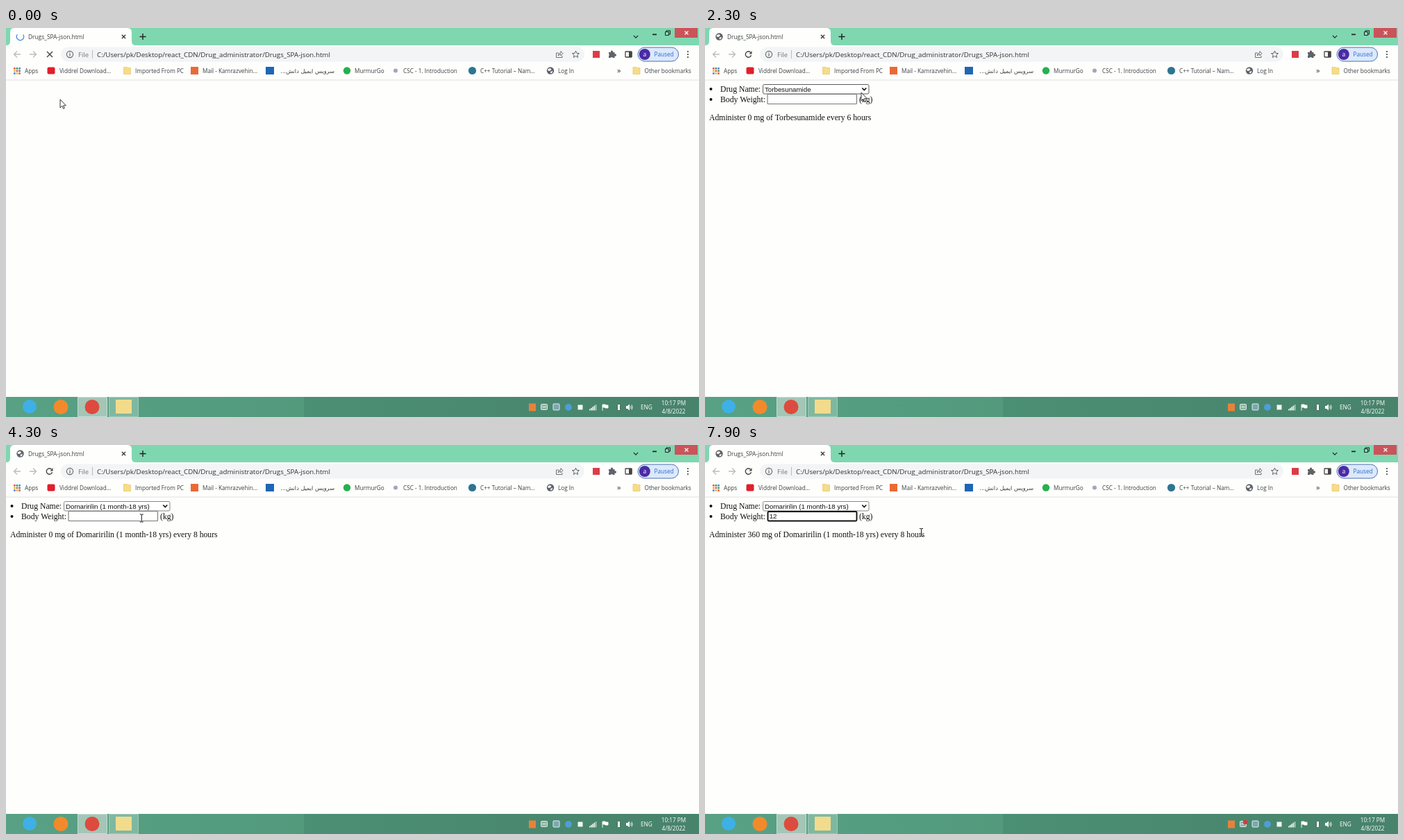
These frames come from a looping animation (998 by 561 pixels, 8 s). An HTML page with a canvas:

```html
<!DOCTYPE html>
<html lang="en">
<head>
<meta charset="utf-8">
<style>
html, body { margin: 0; width: 100%; height: 100%; overflow: hidden; background: #fefefd; }
canvas { display: block; }
</style>
</head>
<body>
<canvas id="stage" width="998" height="561"></canvas>
<script>
const g = document.getElementById('stage').getContext('2d');
const LOOP = 8000;
const UI = '"Open Sans", sans-serif', SERIF = '"Liberation Serif", serif', SANS = '"Liberation Sans", sans-serif';
const INK = '#3c4043', GREY = '#5f6368', PAPER = '#fefefd';

const LOADED = 700, OPEN = 2500, PICK = 4100, FOCUS = 5100, TYPE1 = 5900, TYPE2 = 6200;
const TRAY_FLIPS = [1500, 2000, 2500, 4000, 4500, 5600, 6600, 7000, 7600];
const CARET_FLIPS = [FOCUS, 6900, 7300, 7600];
const PATH = [
  [0, 78, 103], [600, 78, 103], [1300, 214, 112], [1500, 220, 104], [1600, 223, 98], [2000, 225, 91],
  [2300, 225, 93], [2900, 225, 93], [3500, 197, 113], [4000, 197, 113], [4400, 194, 103],
  [4800, 188, 92], [5100, 168, 103], [7200, 168, 103], [7400, 280, 119], [7600, 280, 119], [7900, 311, 126]
];
const DRUGS = ['Torbesunamide', 'Domaririlin (1 month-18 yrs)', 'Ru-Belomitav', 'Petrisomavin (<15 Kg)',
  'Havolidin (1 month-18 yrs)', 'Nilurofatesin (1 month-18 yrs)', 'Kartovumelin (1 month-18 yrs)',
  'Malvorenitase (1 month-18 yrs)', 'Ritlosarention (3 month-18 yrs)', 'Varisobulomeden', 'Sebromaxin (1-18 yrs)'];

function text(s, x, y, color = INK, size = 8.2, font = UI, align = 'left') {
  g.font = `${size}px ${font}`;
  g.textAlign = align;
  g.fillStyle = color;
  g.fillText(s, x, y);
}
function rect(x, y, w, h, color) {
  g.fillStyle = color;
  g.fillRect(x, y, w, h);
}
function box(x, y, w, h, r, fill, stroke, width = 1) {
  g.beginPath();
  g.roundRect(x, y, w, h, r);
  paint(fill, stroke, width);
}
function disc(x, y, r, fill, stroke, width = 1) {
  g.beginPath();
  g.arc(x, y, r, 0, 2 * Math.PI);
  paint(fill, stroke, width);
}
function path(d, x, y, fill, stroke, width = 1) {
  g.save();
  g.translate(x, y);
  const p = new Path2D(d);
  if (fill) { g.fillStyle = fill; g.fill(p); }
  if (stroke) { g.strokeStyle = stroke; g.lineWidth = width; g.stroke(p); }
  g.restore();
}
function paint(fill, stroke, width) {
  if (fill) { g.fillStyle = fill; g.fill(); }
  if (stroke) { g.strokeStyle = stroke; g.lineWidth = width; g.stroke(); }
}
function globe(x, y) {
  disc(x, y, 5.2, GREY);
  path('M-3.5-2.5L0-3.5L1.5-1.5L-1 .5L-3.8 0ZM0 1.5L3.5 .2L2.5 3.2L.5 4Z', x, y, '#f4f4f4');
}
function folder(x, y) {
  path('M-5-5H0L1-4H5V5H-5Z', x, y, '#f6dc86', '#e6c667', .7);
}

function drawTabs(t) {
  rect(0, 0, 998, 25, '#7fd7b0');
  path('M0 25Q6 25 6 19V6Q6 0 12 0H175Q181 0 181 6V19Q181 25 187 25Z', 0, 0, PAPER);
  if (t < LOADED) {
    const a = t / 160 - .6;
    g.beginPath();
    g.arc(20.5, 12.5, 5.2, a, a + 4.4);
    paint(null, '#4b8fe8', 1.4);
  } else globe(20.5, 12.5);
  text('Drugs_SPA-json.html', 32, 15.5, INK, 8.35);
  path('M-2.6-2.6L2.6 2.6M2.6-2.6L-2.6 2.6', 169.5, 12.5, null, '#222', 1.3);
  path('M-4.5 0H4.5M0-4.5V4.5', 197, 12.5, null, '#222', 1.4);
  path('M-3.2-1.6L0 1.6L3.2-1.6', 907, 12.5, null, '#223', 1.2);
  rect(931, 8.5, 6, 1.7, '#222');
  path('M-3-1.5H2V3.5H-3ZM-1.5-1.5V-3.2H4V2H2', 952.5, 7, null, '#222', 1);
  rect(963, 0, 33, 14, '#c9545a');
  path('M-2.5-2.5L2.5 2.5M2.5-2.5L-2.5 2.5', 980, 7, null, '#fff', 1.2);
}

function drawToolbar(t) {
  rect(0, 25, 998, 50, PAPER);
  const arrow = 'M5 0H-4.5M0-4.5L-4.5 0L0 4.5';
  path(arrow, 16, 38, null, '#b9bcc0', 1.3);
  g.save();
  g.scale(-1, 1);
  path(arrow, -39, 38, null, '#b9bcc0', 1.3);
  g.restore();
  if (t < LOADED) path('M-4-4L4 4M4-4L-4 4', 63, 38, null, '#444', 1.4);
  else {
    g.beginPath();
    g.arc(62.5, 38, 4.2, .3, 5.5);
    paint(null, '#444', 1.4);
    path('M1 0H5V-4.5Z', 62.5, 37.5, '#444');
  }
  box(79, 27.5, 754, 21, 10.5, '#f3f4f5');
  disc(92, 38, 4.6, null, GREY, 1.1);
  rect(91.4, 37.2, 1.2, 3.4, GREY);
  rect(91.4, 35.2, 1.2, 1.2, GREY);
  text('File', 104, 41.5, '#777', 9.5);
  rect(124, 32, 1, 12, '#b8bbbf');
  text('C:/Users/pk/Desktop/react_CDN/Drug_administrator/Drugs_SPA-json.html', 131, 41.5, '#303134', 9.77);

  path('M-1-2H-4.5V4.5H4V2M-2 2Q-1.5-2 2-2V-4.5L5-1.2L2 1.8V0Q0 0-2 2Z', 797, 38, null, GREY, .9);
  path('M0-5L1.4-1.7L5-1.4L2.3 1L3.1 4.5L0 2.6L-3.1 4.5L-2.3 1L-5-1.4L-1.4-1.7Z', 820.5, 38, null, GREY, 1);
  rect(845, 33, 10, 10, '#dc3c48');
  path('M-5-3H-2A1.7 1.7 0 1 1 1-3H3.5V-.5A1.7 1.7 0 1 1 3.5 2.5V5H.8A1.7 1.7 0 0 0-2.2 5H-5V2A1.6 1.6 0 0 0-5-.7Z', 873, 38, GREY);
  box(892, 34, 9, 8, .5, null, '#444', 1.3);
  rect(897, 34, 4.5, 8, '#444');
  box(910, 28, 58.5, 20, 10, '#dbe9fc', '#4d6fae', 1);
  disc(919.8, 38, 8, '#4a2ba5');
  text('a', 919.8, 41, '#fff', 8.5, UI, 'center');
  text('Paused', 933.5, 41, '#2f68c5', 8.2);
  for (const y of [34, 38, 42]) disc(982, y, 1.1, '#444');
}

function drawBookmarks() {
  const y = 64.5, cy = 61.5;
  const appColors = ['#e5594a', '#3d9b5f', '#4a86e0', '#e9b534'];
  for (let i = 0; i < 9; i++) rect(11 + i % 3 * 3.6, 57 + (i / 3 | 0) * 3.6, 2.6, 2.6, appColors[i % 4]);
  text('Apps', 27, y);
  box(59.5, 56.5, 11, 10, 2, '#e0202b');
  text('Viddrel Download...', 77, y);
  folder(174.5, cy);
  text('Imported From PC', 186, y);
  rect(266, 56, 11, 11, '#ea6a35');
  text('Mail - Kamrazvehin...', 283, y);
  rect(374, 56, 12, 11, '#1f66b5');
  g.direction = 'rtl';
  text('سرویس ایمیل دانش...', 473, y, INK, 8.2, '"DejaVu Sans", sans-serif', 'right');
  g.direction = 'ltr';
  disc(491, cy, 5.2, '#27b04f');
  text('MurmurGo', 502, y);
  disc(561, cy, 3, '#a3a7b8');
  text('CSC - 1. Introduction', 572, y);
  disc(671.5, cy, 5.6, '#2d7591');
  text('C++ Tutorial – Nam...', 683, y);
  globe(784, cy);
  text('Log In', 795, y);
  text('»', 880, y, '#333', 11);
  folder(908, cy);
  text('Other bookmarks', 919.5, y);
  rect(0, 74.5, 998, 1, '#dfe1e3');
}

function drawTaskbar(t) {
  const bar = g.createLinearGradient(0, 0, 998, 0);
  bar.addColorStop(0, '#58a184');
  bar.addColorStop(.43, '#539a7d');
  bar.addColorStop(.43, '#4b8f74');
  bar.addColorStop(1, '#48836c');
  rect(0, 532, 998, 29, bar);
  box(103.5, 532.5, 42, 28, 0, '#a3c6b7', '#c5ddd2');
  box(148.5, 532.5, 42, 28, 0, '#7fb8a0', '#9fcab7');
  disc(34, 546, 10, '#3fb0e6');
  disc(79, 546.5, 10.5, '#f28a2c');
  disc(124, 546.5, 10.5, '#dd4b3e');
  rect(158, 536, 23, 20, '#f2dc8c');

  rect(753, 541.5, 10, 11, '#e8823a');
  box(770.5, 542.5, 9, 8, 1, '#8fb5a6', '#e4eee9', 1);
  rect(772.5, 546, 5, 1, '#e4eee9');
  if (flipped(TRAY_FLIPS, t)) disc(778, 544, 3.2, '#d23b42');
  box(788, 542, 9, 9, 1, '#7aa7b4', '#e4eee9', 1);
  disc(810, 547, 5, '#4d9ed4');
  rect(823.5, 543.5, 7, 7, '#f2f7f4');
  for (let i = 0; i < 5; i++) rect(840 + i * 2.2, 549.5 - i * 1.6, 1.5, 2 + i * 1.6, i < 4 ? '#fff' : '#b9d6ca');
  path('M-4-4V5M-4-4H0L1-3H4V1H0L-1 0H-4', 863, 547, '#fff', '#fff', .9);
  box(880.5, 542.5, 4, 9, 1, '#fff', '#2f5a4a', .8);
  path('M-5-2H-3L0-4.5V4.5L-3 2H-5Z', 898, 547, '#fff');
  path('M1.5-2Q3 0 1.5 2M3-3.5Q5.5 0 3 3.5', 898, 547, null, '#fff', .9);
  text('ENG', 914, 550, '#fff', 8.2);
  text('10:17 PM', 961.5, 544, '#fff', 8.2, UI, 'center');
  text('4/8/2022', 961.5, 556, '#fff', 8.2, UI, 'center');
}

function drawPage(t, mouse) {
  const drug = DRUGS[t < PICK ? 0 : 1], hours = t < PICK ? 6 : 8;
  const weight = t < TYPE1 ? '' : t < TYPE2 ? '1' : '12';
  const say = (s, x, y) => text(s, x, y, '#111', 11.69, SERIF);

  disc(8.5, 88, 2, '#111');
  disc(8.5, 103, 2, '#111');
  say('Drug Name:', 22, 91.5);
  say('Body Weight:', 22, 106.5);
  say('(kg)', 222, 106.5);
  say(`Administer ${weight * 30} mg of ${drug} every ${hours} hours`, 6, 132.5);

  box(83.5, 81.5, 152.5, 13.5, 2, '#fff', overSelect(mouse) ? '#5a5a5a' : '#858585');
  text(drug, 86, 91.5, '#111', 9.74, SANS);
  path('M-3-1.5L0 1.5L3-1.5', 229.3, 88, null, '#111', 1.6);

  if (t >= FOCUS) box(90.5, 96, 128, 13.5, 1.5, '#fff', '#111', 1.9);
  else box(90, 95.5, 128.5, 14, 1, '#fff', '#777', 1.1);
  text(weight, 92.7, 106, '#111', 9.74, SANS);
  if (flipped(CARET_FLIPS, t)) rect(93 + weight.length * 5.4, 97.5, 1, 10.5, '#222');

  if (isOpen(t)) drawList(mouse);
}

function drawList(mouse) {
  const row = 12.15, top = 95;
  const active = Math.max(0, Math.floor((mouse.y - top) / row));
  box(83.5, 95.5, 153, 134.5, 0, '#fff', '#777');
  DRUGS.forEach((name, i) => {
    if (i === active) rect(84, top + .7 + i * row, 152, row, '#1e8df2');
    text(name, 87, 104.5 + i * row, i === active ? '#fff' : '#111', 9.5, SANS);
  });
}

function isOpen(t) { return t >= OPEN && t < PICK; }
function overSelect(m) { return m.x > 83 && m.x < 236 && m.y > 81 && m.y < 95; }
function flipped(times, t) { return times.filter(time => time <= t).length % 2 === 1; }

function mouseAt(t) {
  const i = PATH.findIndex(p => p[0] > t);
  if (i < 0) return { x: PATH.at(-1)[1], y: PATH.at(-1)[2] };
  const [t0, x0, y0] = PATH[i - 1], [t1, x1, y1] = PATH[i];
  const k = (t - t0) / (t1 - t0);
  return { x: x0 + (x1 - x0) * k, y: y0 + (y1 - y0) * k };
}

function drawMouse(t, m) {
  if (t < LOADED || isOpen(t) || overSelect(m))
    path('M0 0V12L2.8 9.4L4.5 13.4L6.3 12.6L4.6 8.8H8.3Z', m.x, m.y, '#fff', '#222', .9);
  else {
    const beam = 'M-2.5-5.5H-.6L0-5L.6-5.5H2.5M0-5V5M-2.5 5.5H-.6L0 5L.6 5.5H2.5';
    path(beam, m.x + .5, m.y, null, '#fff', 2);
    path(beam, m.x + .5, m.y, null, '#111', 1);
  }
}

function frame(now) {
  const t = Math.floor(now % LOOP / 100) * 100;
  const mouse = mouseAt(t);
  rect(0, 0, 998, 561, PAPER);
  drawTabs(t);
  drawToolbar(t);
  drawBookmarks();
  if (t >= LOADED) drawPage(t, mouse);
  drawTaskbar(t);
  drawMouse(t, mouse);
  requestAnimationFrame(frame);
}
requestAnimationFrame(frame);
</script>
</body>
</html>
```
